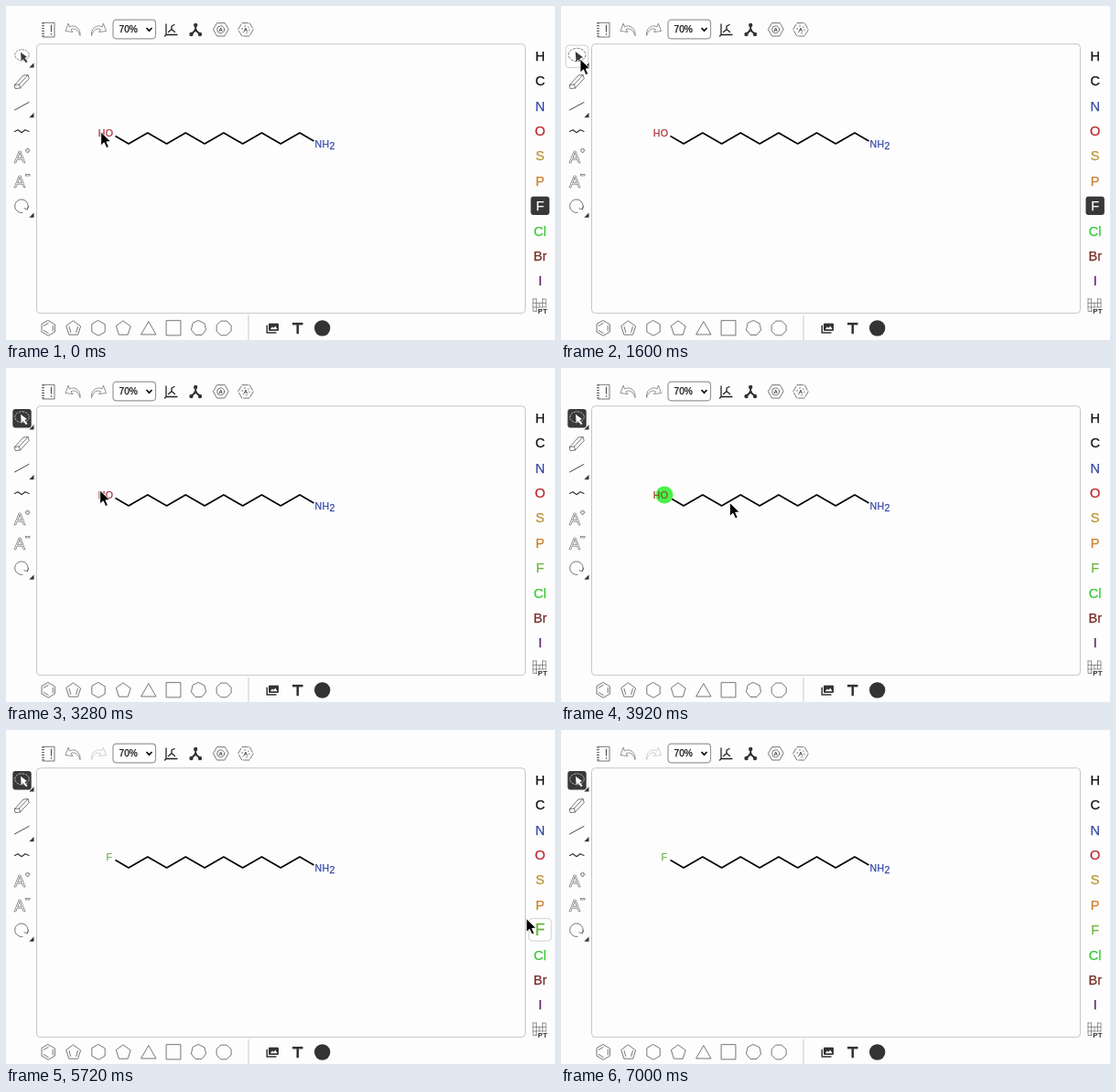
Animation of 600 by 366 pixels, one loop 7.04 s. Source, as an HTML page:

```html
<!DOCTYPE html>
<html lang="en">
<head>
<meta charset="utf-8">
<title>Molecule sketcher</title>
<style>
html, body { margin: 0; width: 100%; height: 100%; overflow: hidden; background: #fdfdfd; }
svg { display: block; width: 100vw; height: 100vh; }
text { font-family: "Liberation Sans", Arial, sans-serif; }
.icon { fill: none; stroke: #555; stroke-width: .8; stroke-linejoin: round; stroke-linecap: round; }
.solid { fill: #333; stroke: none; }
.mid { text-anchor: middle; }
.atom { font-size: 10.6px; letter-spacing: .35px; }
.firm { stroke: currentColor; stroke-width: .25px; fill: currentColor; }
</style>
</head>
<body>
<svg id="stage" viewBox="0 0 600 366" xmlns="http://www.w3.org/2000/svg">
  <rect width="600" height="366" fill="#fdfdfd"/>
  <rect x="33.5" y="41.7" width="534" height="295" rx="4" fill="#fdfdfd" stroke="#c6c6c6"/>

  <!-- top bar -->
  <g class="icon">
    <path d="M40.500 18.300H53V34H40.500"/>
    <path d="M40.500 18.300V34" stroke-width="2.600" stroke-dasharray="1.200 1.600" stroke-linecap="butt"/>
    <path d="M49.500 21V28M49.500 30.500V31.200" stroke-width="1.200"/>
    <path id="undo" d="M68 19.500L65 27.500L73 28.500L71 25.800C75 23.500 79 26 81 32.500C82 25 75.500 19.500 69.800 22.700Z"/>
    <path id="redo" d="M106.500 19.500L109.500 27.500L101.500 28.500L103.500 25.800C99.500 23.500 95.500 26 93.500 32.500C92.500 25 99 19.500 104.700 22.700Z"/>
    <path d="M175 20V31.500H187M175 31.500L173.500 33M177.500 28.500L181 25.500L184.500 28.500M181 25.500V22L184 20.500" stroke="#222" stroke-width="1.300"/>
    <path d="M207.200 21V26.500L202.700 30.500M207.200 26.500L211.700 30.500" stroke="#222" stroke-width="1.700"/>
  </g>
  <g class="solid">
    <circle cx="207.200" cy="21" r="2.200"/><circle cx="207.200" cy="26.500" r="1.800"/>
    <circle cx="202.500" cy="31" r="2.200"/><circle cx="212" cy="31" r="2.200"/>
  </g>
  <rect x="117" y="15.200" width="46.500" height="20.600" rx="3.500" fill="#fff" stroke="#999" stroke-width="1.200"/>
  <text class="firm" x="123.500" y="29" font-size="10.200" color="#111">70%</text>
  <path d="M153.500 24L156.500 27.200L159.500 24" fill="none" stroke="#111" stroke-width="1.700"/>
  <g id="rings" class="icon"></g>
  <circle class="icon" cx="234.700" cy="25.800" r="4"/>
  <circle class="icon" cx="262" cy="25.800" r="4" stroke-dasharray="1.200 3"/>
  <text class="mid" x="234.700" y="28" font-size="6" font-weight="bold" fill="#333">A</text>
  <text class="mid" x="262" y="28" font-size="6" font-weight="bold" fill="#333">A</text>

  <!-- left bar -->
  <g id="lasso">
    <rect id="lassoBox" x="-10.200" y="-10.200" width="20.400" height="20.400" rx="3"/>
    <ellipse id="lassoLoop" class="icon" cx="0" cy="-1.500" rx="7.800" ry="6" stroke-width=".7" stroke-dasharray="2 1.600"/>
    <path id="lassoArrow" d="M-1.500 -4.500L-.8 4.800L1.200 3L4.500 7L6 5.700L2.800 1.700L5.500 .8Z"/>
  </g>
  <g class="icon">
    <path d="M9.500 86.500L19 76L24 75.500L25.200 79.500L15.500 90L10.500 90.500ZM9.500 86.500L14.500 86L24 75.500M14.500 86L15.500 90"/>
    <path d="M9.500 114L25 105.500" stroke="#333" stroke-width=".9"/>
    <path d="M9.500 137.500L13 135.700L17 138.700L21 135.700L25 137.500" stroke="#333" stroke-width="1.200"/>
    <path d="M18 226.500A7.300 7.300 0 1 1 23.500 222.500M24.500 219.500L23.300 223L20 221.800"/>
  </g>
  <g fill="#fdfdfd" stroke="#666" stroke-width=".65">
    <text x="9" y="171.500" font-size="18">A</text>
    <text x="9" y="198.700" font-size="18">A</text>
    <path d="M21.300 157.500H22.800V156H24.400V157.500H26V159.100H24.400V160.600H22.800V159.100H21.300Z"/>
    <rect x="21.300" y="184.500" width="4.700" height="1.500"/>
  </g>
  <path class="solid" d="M30.500 62.300V67.500H25.300ZM30.500 117V122.200H25.300ZM30.500 226.500V231.700H25.300Z"/>

  <!-- bottom bar -->
  <path d="M265 339V366" stroke="#c8c8c8"/>
  <g class="solid">
    <path d="M284.500 350V358.700H295.500V357.300H286V350Z"/>
    <rect x="287" y="347.700" width="11" height="8.300" rx="1"/>
    <path d="M288.800 354.300L291 351.500L292.300 353L294.300 350.700L296.700 354.300Z" fill="#fff"/>
    <path d="M313 347H324.500V349.500H320V359.300H317.500V349.500H313Z"/>
    <circle cx="345.700" cy="353" r="8.700"/>
  </g>

  <!-- right bar -->
  <g id="elements"></g>
  <path class="icon" stroke-opacity=".75" d="M576 321V334.500H580M576 325.500H590M576 330H590M579.500 321V334.500M583 325.500V330M586.500 321V330M576 321H579.500M586.500 321H590V330"/>
  <text x="581.300" y="337" font-size="8" font-weight="bold" fill="#333">PT</text>

  <!-- molecule -->
  <path id="chain" fill="none" stroke="#000" stroke-width="1.700" stroke-linejoin="round"/>
  <circle id="mark" cx="113" cy="139" r="9.500" fill="#4cf04a"/>
  <text id="hydroxyl" class="atom" x="100.700" y="143"><tspan id="hydrogen" class="firm">H</tspan><tspan id="oxygen" class="firm">O</tspan></text>
  <text id="fluorine" class="atom mid firm" x="113" y="143" color="#78ad48">F</text>
  <text class="atom firm" x="337.500" y="154.800" color="#3346a8">NH<tspan dy="2.500">2</tspan></text>

  <path id="cursor" d="M0 0V15L3.500 11.800L6.100 17.500L8.700 16.400L6.200 10.900L10.700 10.600Z" fill="#000" stroke="#fff" stroke-width=".9"/>
</svg>
<script>
const LOOP = 7040, STEP = 40, DARK = '#383838';
const $ = id => document.getElementById(id);

function set(node, attrs) {
  for (const key in attrs) node.setAttribute(key, attrs[key]);
}
function add(parent, tag, attrs, text) {
  const node = document.createElementNS('http://www.w3.org/2000/svg', tag);
  set(node, attrs);
  if (text) node.textContent = text;
  parent.appendChild(node);
  return node;
}
function show(node, on) {
  node.setAttribute('visibility', on ? 'visible' : 'hidden');
}

function ring(x, y, sides, r, turn = -90) {
  const pts = Array.from({ length: sides }, (_, i) => {
    const a = (turn + i * 360 / sides) * Math.PI / 180;
    return (x + r * Math.cos(a)).toFixed(2) + ',' + (y + r * Math.sin(a)).toFixed(2);
  });
  return add($('rings'), 'polygon', { points: pts.join(' ') });
}
ring(234.7, 25.8, 6, 8.3, 0);
ring(262, 25.8, 6, 8.3, 0).setAttribute('stroke-dasharray', '6.5 1.8');
ring(46.2, 353, 6, 8.3);
ring(73.7, 353.5, 5, 8.3);
ring(101, 353, 6, 8.3);
ring(128.3, 353.5, 5, 8.3);
add($('rings'), 'path', { d: 'M156 346L164 360H148Z' });
ring(183, 353, 4, 11.2, -45);
ring(210.5, 353, 7, 8.3);
ring(238, 353, 8, 8.5, 22.5);
add($('rings'), 'path', { d: 'M41.2 350.5L46.2 347.5M51.2 350.5V356M46.2 358.5L41.2 355.5M69 351.5L70.7 357.5M78.4 351.5L76.7 357.5' });

// zigzag carbon chain
let chain = 'M119.5 142.5';
for (let i = 0; i < 10; i++) chain += `L${(134 + i * 20.78).toFixed(1)} ${i % 2 ? 139 : 151}`;
$('chain').setAttribute('d', chain + 'L336.5 148');

const colors = {
  H: '#111', C: '#111', N: '#3346a8', O: '#bd2830', S: '#b8922f',
  P: '#d0802f', F: '#6cb33f', Cl: '#35c935', Br: '#792c25', I: '#5b1a70'
};
const buttons = {};
Object.keys(colors).forEach((name, i) => {
  const g = add($('elements'), 'g', {});
  const box = add(g, 'rect', { x: -10.2, y: -10.2, width: 20.4, height: 20.4, rx: 3 });
  const label = add(g, 'text', { class: 'mid firm', y: 5.2, 'font-size': 14.6 }, name);
  buttons[name] = { g, box, label, y: 54.5 + i * 27.4 };
});

// background of a tool button in its resting, hovered or chosen state
function paintBox(box, chosen, hover) {
  set(box, {
    fill: chosen ? DARK : hover ? '#fff' : 'none',
    stroke: hover && !chosen ? '#ccc' : 'none',
    'stroke-width': .8
  });
}
const place = (x, y, hover) => `translate(${x} ${y}) scale(${hover ? 1.2 : 1})`;

// time, x, y of the pointer tip
const route = [
  [0, 103.7, 138], [760, 103.7, 138], [1520, 22, 63], [1600, 21, 58],
  [1920, 21, 57], [2200, 22.7, 50.5], [2480, 22.7, 50.5], [2920, 92, 125],
  [3280, 102.7, 134], [3520, 111, 139], [3760, 111, 139], [4400, 581, 193],
  [4480, 583.5, 196.5], [4720, 587, 218], [5520, 587, 218], [5720, 568.7, 206.5],
  [6200, 98, 80], [6720, 330, 326]
];
function pointer(t) {
  const i = route.findIndex(p => p[0] > t);
  if (i < 0) return route[route.length - 1].slice(1);
  const [a, b] = [route[i - 1], route[i]];
  const u = (t - a[0]) / (b[0] - a[0]), e = u * u * (3 - 2 * u);
  return [a[1] + (b[1] - a[1]) * e, a[2] + (b[2] - a[2]) * e];
}

function draw(t) {
  const within = (a, b) => t >= a && t < b;
  const lassoOn = t >= 2000, replaced = t >= 5120;
  const lassoHover = within(1520, 2560);
  const marked = within(3560, 5120);
  const hovered = within(4400, 4560) ? 'P' : within(4560, 5760) ? 'F' : '';

  $('lasso').setAttribute('transform', place(17.5, 55.3, lassoHover));
  paintBox($('lassoBox'), lassoOn, lassoHover);
  $('lassoLoop').style.stroke = lassoOn ? '#ccc' : '#777';
  set($('lassoArrow'), { fill: lassoOn ? '#fff' : DARK });

  for (const name in buttons) {
    const { g, box, label, y } = buttons[name];
    const hover = name === hovered, chosen = name === 'F' && !lassoOn;
    g.setAttribute('transform', place(583.7, y, hover));
    paintBox(box, chosen, hover);
    label.setAttribute('color', chosen ? '#fff' : hover && name === 'P' ? '#ee7d20' : colors[name]);
  }

  $('undo').style.stroke = '#777';
  $('redo').style.stroke = replaced ? '#c4c4c4' : '#777';
  show($('mark'), marked);
  show($('hydroxyl'), !replaced);
  show($('fluorine'), replaced);
  set($('hydrogen'), { color: marked ? '#93402a' : '#a8323a' });
  set($('oxygen'), { color: marked ? '#6d6420' : '#a8323a' });

  const [x, y] = pointer(t);
  $('cursor').setAttribute('transform', `translate(${x.toFixed(2)} ${y.toFixed(2)})`);
  show($('cursor'), t < 6760);
}

const start = performance.now();
function tick() {
  const t = (performance.now() - start) % LOOP;
  draw(Math.floor(t / STEP) * STEP);
  requestAnimationFrame(tick);
}
tick();
</script>
</body>
</html>
```
